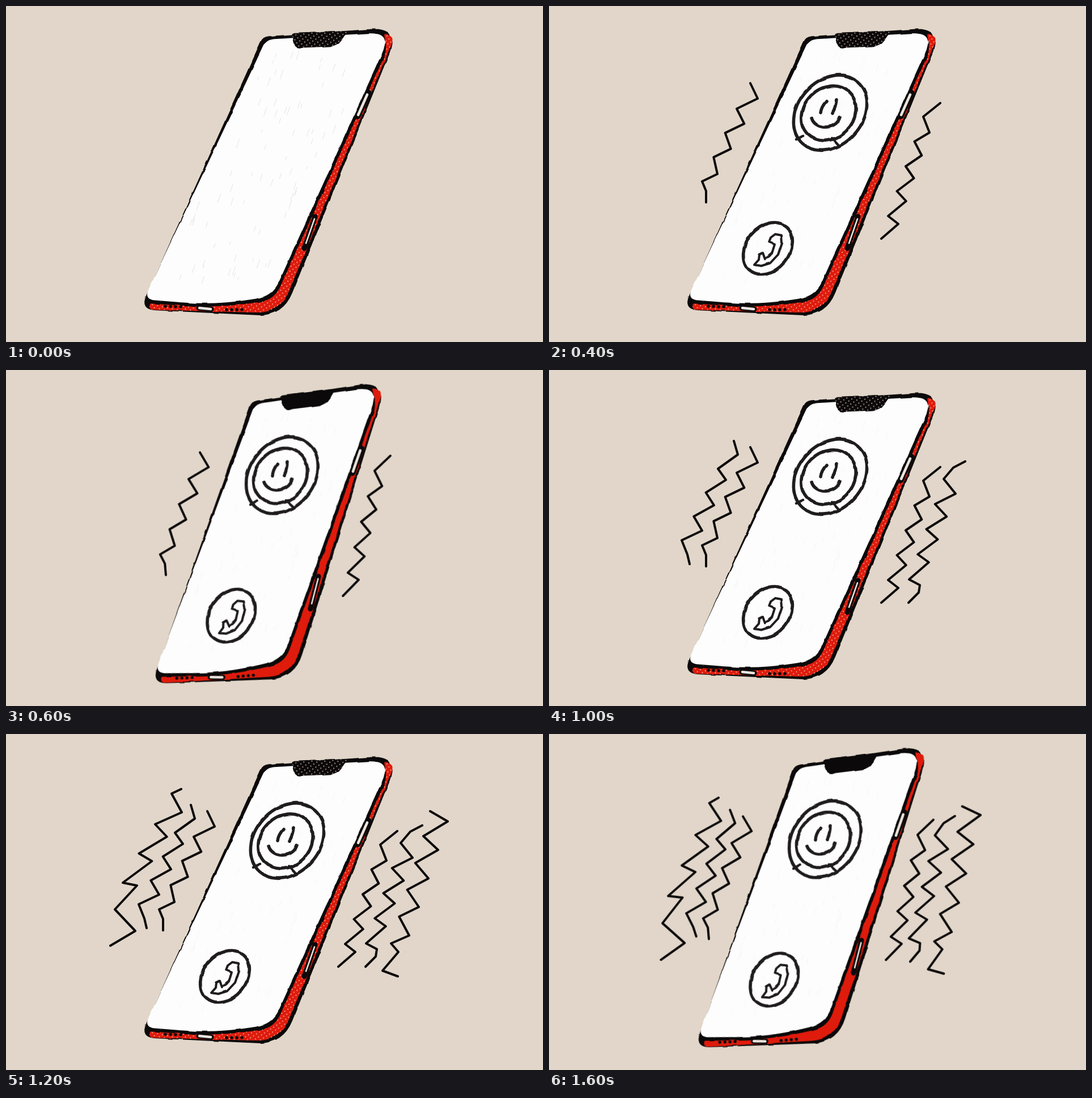
An HTML page for the animation above (1.8 s loop, 947 px wide and 592 px high).

```html
<!DOCTYPE html>
<html lang="en">
<head>
<meta charset="utf-8">
<title>Ringing phone</title>
<style>
  html, body { margin: 0; width: 100%; height: 100%; overflow: hidden; background: #e1d6c9; }
  svg { display: block; width: 947px; height: 592px; }
  .ink { fill: none; stroke: #0b090a; stroke-linecap: round; stroke-linejoin: round; }
  .light { stroke: #eae4dc; }
  .anim { animation: 1800ms step-end infinite; }
  .tilt { transform-origin: 460px 295px; animation-name: tilt; }
  .dots { animation-name: dots; }
  .grain { animation-name: grain; }
  .call { animation-name: call; }
  .wave1 { animation-name: wave1; }
  .wave2 { animation-name: wave2; }
  .wave3 { animation-name: wave3; }
  @keyframes tilt {
    0%, 55.55% { transform: none; }
    33.33%, 77.77%, 100% { transform: translate(var(--dx, 0px), var(--dy, 0px)) rotate(-4.8deg); }
  }
  @keyframes dots {
    0%, 55.55% { opacity: 1; }
    33.33%, 77.77%, 100% { opacity: 0; }
  }
  @keyframes grain { 0% { opacity: 1; } 11.11%, 100% { opacity: .3; } }
  @keyframes call { 0% { opacity: 0; } 11.11%, 100% { opacity: 1; } }
  @keyframes wave1 { 0% { opacity: 0; } 22.22%, 100% { opacity: 1; } }
  @keyframes wave2 { 0% { opacity: 0; } 44.44%, 100% { opacity: 1; } }
  @keyframes wave3 { 0% { opacity: 0; } 66.66%, 100% { opacity: 1; } }
</style>
</head>
<body>
<svg viewBox="0 0 947 592">
  <defs>
    <filter id="rough" x="-5%" y="-5%" width="110%" height="110%" color-interpolation-filters="sRGB">
      <feTurbulence type="fractalNoise" baseFrequency=".05" seed="4"/>
      <feDisplacementMap in="SourceGraphic" scale="4" xChannelSelector="R" yChannelSelector="G"/>
    </filter>
    <pattern id="pale" width="9" height="9" patternUnits="userSpaceOnUse" patternTransform="rotate(12)">
      <g fill="#f6cfc2"><circle cx="2" cy="2" r=".9"/><circle cx="6.5" cy="6.5" r=".9"/></g>
    </pattern>
    <path id="side"/>
    <path id="notch"/>
  </defs>

  <g class="tilt anim">
    <g filter="url(#rough)">
      <path id="body" fill="#0b090a"/>
      <path id="screen" fill="#fdfdfd"/>
      <use href="#notch" fill="#0b090a"/>
      <use href="#side" fill="#df1b0c"/>
    </g>
    <g class="dots anim" fill="url(#pale)">
      <use href="#side"/>
      <use href="#notch"/>
    </g>
    <g class="ink">
      <path stroke-width="11" d="M639 153 620 194"/>
      <path stroke-width="9" d="M545 371 526 427"/>
      <path stroke-width="9" d="M340 532 362 534"/>
      <path stroke-width="5.5" stroke-dasharray="0 9" d="M281 529 309 530M389 535 419 535"/>
      <path class="light" stroke-width="4.5" d="M637 156 621 192"/>
      <path class="light" stroke-width="2.5" d="M544 375 529 418"/>
      <path class="light" stroke-width="4.5" d="M341 532 361 534"/>
    </g>
    <path id="grain" class="grain anim ink" style="stroke:#dedede" stroke-width=".8"/>
    <g class="call anim">
      <g class="ink" style="stroke:#1f1c1e" stroke-width="5.6" filter="url(#rough)">
        <ellipse rx="73" ry="57" transform="translate(496 188) rotate(-48)"/>
        <ellipse rx="52" ry="44" transform="translate(493 189) rotate(-45)"/>
        <ellipse rx="50" ry="38" transform="translate(386 427) rotate(-50)"/>
        <path stroke-width="4.5" d="M436 235 448 229M500 233 510 244"/>
        <path d="M489 168Q480 178 479 188M507 165Q506 178 500 188M463 197C468 218 506 220 513 196"/>
        <path stroke-width="4" d="M399 402 410 404 411 417 404 438 390 453 374 458 362 456 370 447
          371 438 377 435 381 446 393 436 398 420 388 416 391 408Z"/>
      </g>
    </g>
  </g>

  <g id="waves" class="ink" stroke-width="4"></g>
</svg>
<script>
  const byId = id => document.getElementById(id);
  const setPath = (id, d) => byId(id).setAttribute('d', d);
  const mix = (p, q, t) => p.map((v, i) => v + (q[i] - v) * t);
  const towards = (p, q, dist) => mix(p, q, dist / Math.hypot(q[0] - p[0], q[1] - p[1]));

  // Polygon from [x, y, radius] corners, each cut off at its radius
  const rounded = pts => 'M' + pts.map(([x, y, r], i) => {
    const n = pts.length, corner = [x, y];
    const prev = pts[(i + n - 1) % n].slice(0, 2), next = pts[(i + 1) % n].slice(0, 2);
    return `${towards(corner, prev, r)}Q${corner} ${towards(corner, next, r)}`;
  }).join('L') + 'Z';

  setPath('body', rounded([[453, 54, 10], [695, 37, 52], [488, 547, 45], [236, 535, 28]]));
  setPath('screen', rounded([[459, 59, 14], [680, 46, 40], [470, 511, 28], [370, 527, 60], [243, 517, 20]]));
  setPath('notch', rounded([[504, 48, 2], [603, 44, 2], [584, 71, 14], [510, 74, 8]]));
  setPath('side', rounded([[667, 49, 2], [686, 52, 16], [483, 541, 42], [252, 535, 8],
    [254, 524, 2], [372, 532, 60], [473, 518, 26], [671, 80, 10]]));

  // Faint slanted pencil marks on the screen
  let seed = 7;
  const rnd = () => (seed = seed * 16807 % 2147483647) / 2147483647;
  let marks = '';
  for (let i = 0; i < 75; i++) {
    const v = rnd(), len = 4 + 12 * rnd();
    marks += `M${465 - 200 * v + rnd() * 180} ${80 + 415 * v}l${-len * .35} ${len}`;
  }
  setPath('grain', marks);

  // Zigzag that hops between two rails, with a lead-in and a tail
  function zigzag({ head, a, b, n, tail }) {
    const counts = [Math.ceil(n / 2), Math.floor(n / 2)];
    const corners = Array.from({ length: n }, (_, i) => {
      const rail = i % 2 ? b : a;
      return mix(rail[0], rail[1], (i >> 1) / (counts[i % 2] - 1));
    });
    return `M${head}L${corners.join(' ')} ${tail}`;
  }

  // From the phone outwards; nudge is the extra shift while tilted
  const left = [
    { head: '355 136', a: [[368, 163], [297, 296]], b: [[331, 181], [270, 309]], n: 8, tail: '277 326 277 346', nudge: [0, 0] },
    { head: '326 125', a: [[333, 149], [270, 283]], b: [[298, 174], [234, 300]], n: 8, tail: '244 325 248 342', nudge: [7, -3] },
    { head: '309 97 292 105', a: [[310, 138], [231, 267]], b: [[263, 159], [206, 262]], n: 7, tail: '192 309 228 347 184 373', nudge: [6, 2] }
  ];
  const right = [
    { head: '690 171', a: [[660, 195], [598, 370]], b: [[671, 223], [616, 384]], n: 10, tail: '586 410', nudge: [-1, -1] },
    { head: '734 161 713 172', a: [[696, 192], [635, 369]], b: [[717, 218], [654, 379]], n: 10, tail: '652 392 634 410', nudge: [-6, 6] },
    { head: '748 136', a: [[779, 154], [711, 355]], b: [[736, 180], [679, 369]], n: 10, tail: '692 384 664 417 691 427', nudge: [-5, 15] }
  ];
  const drawWave = (w, i) => `<g class="wave${i + 1} anim"><path class="tilt anim" d="${zigzag(w)}"
    style="--dx:${w.nudge[0]}px;--dy:${w.nudge[1]}px"/></g>`;
  byId('waves').innerHTML = [left, right].map(side => side.map(drawWave).join('')).join('');
</script>
</body>
</html>
```
